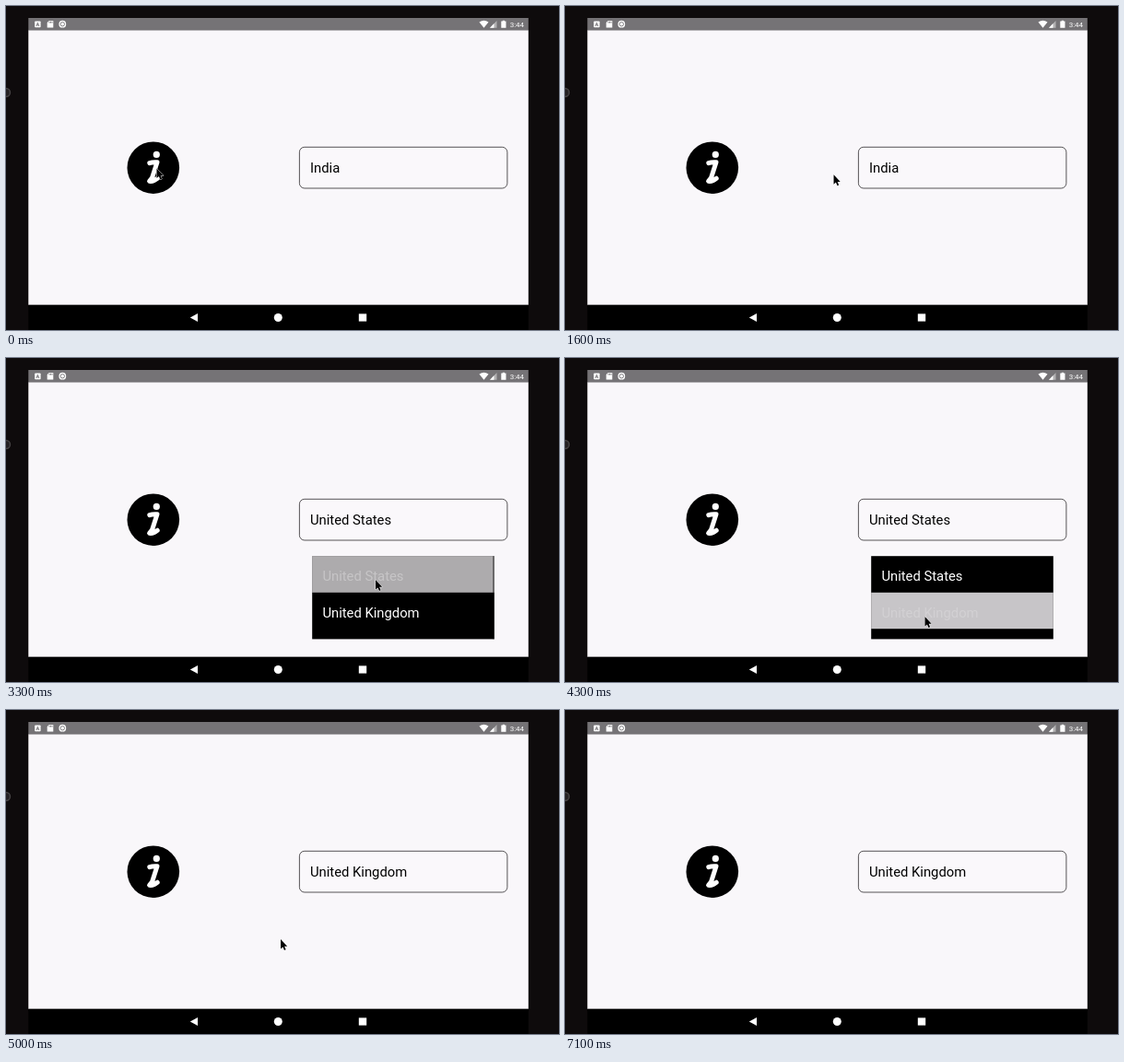
Write an HTML page that moves like this. It is 600 px wide and 352 px high and loops after 7800 ms.

```html
<!DOCTYPE html>
<html lang="en">
<head>
<meta charset="utf-8">
<title>Country picker</title>
<style>
html, body { margin: 0; width: 100%; height: 100%; overflow: hidden; background: #0e0b0c; }
svg { display: block; width: 600px; height: 352px; }
text { font: 14.8px Roboto, "Noto Sans", sans-serif; }
</style>
</head>
<body>
<svg viewBox="0 0 600 352">
  <rect width="600" height="352" fill="#0e0b0c"/>
  <circle cx="0" cy="94" r="4.5" fill="#242123" stroke="#454243" stroke-width="1.4"/>
  <rect x="24.3" y="13" width="542.5" height="14" fill="#757376"/>
  <rect x="24.3" y="26.5" width="542.5" height="298.3" fill="#f9f7fa"/>
  <rect x="24.3" y="324.8" width="542.5" height="27.2"/>

  <g fill="#fff">
    <rect x="31.2" y="16.4" width="6.4" height="6.8" rx=".8"/>
    <path d="M46.7 15.9H51.3V23.5H44.7V18Z"/>
    <circle cx="61.3" cy="19.7" r="3.9"/>
    <path d="M513.5 17.6Q518.5 13.8 523.5 17.6L518.5 23.8Z"/>
    <path d="M525 23.7L532.5 16V23.7Z" opacity=".45"/>
    <path d="M525 23.7L529.5 19.1V23.7Z"/>
    <path d="M537.3 16.6H538.8V15.8H541V16.6H542.5V23.7H537.3Z"/>
    <text x="546.7" y="22.8" style="font-size:8px">3:44</text>
    <path d="M199.8 338.5L208 334V343Z"/>
    <circle cx="295.3" cy="338.5" r="4.5"/>
    <rect x="382.8" y="334.4" width="8.4" height="8.2"/>
  </g>
  <g fill="none" stroke="#757376" stroke-width=".9">
    <path d="M33 22L34.4 18L35.8 22M33.6 20.6H35.2"/>
    <path d="M47 16.8V18.5M48.5 16.8V18.5M50 16.8V18.5"/>
    <circle cx="61.3" cy="19.7" r="2.2"/>
  </g>

  <circle cx="159.8" cy="175.7" r="28.3"/>
  <circle cx="163.3" cy="161.4" r="3.6" fill="#fff"/>
  <path d="M155.8 170.6Q159 169.4 164 169.8L158.6 186.5Q157 191.5 164.2 187.4M158.6 186.5L155.6 190.2Q159 191.6 164.2 187.4" fill="none" stroke="#fff" stroke-width="5" stroke-linecap="round" stroke-linejoin="round"/>

  <rect x="318.4" y="153.3" width="225.5" height="44.7" rx="5.5" fill="#faf8fb" stroke="#2c2a2c" stroke-width=".8"/>
  <text id="value" x="330" y="181.4"></text>

  <g id="menu">
    <rect x="332.2" y="215.2" width="197.6" height="90.2"/>
    <rect id="glow0" x="332.2" y="215.2" width="197.6" height="39.6" fill="#f9f7fa"/>
    <rect id="glow1" x="332.2" y="254.8" width="197.6" height="39.4" fill="#f9f7fa"/>
    <rect id="scrollbar" x="528" y="215.2" width="1.8" height="90.2" opacity=".4"/>
    <text id="item0" x="343.4" y="242.1" fill="#fff">United States</text>
    <text id="item1" x="343.4" y="281.6" fill="#fff">United Kingdom</text>
  </g>
  <path id="cursor" d="M0 0V10.6L2.4 8.4L4 12L5.6 11.3L4.1 7.8H7.2Z" stroke="#fff" stroke-width=".9" paint-order="stroke"/>
</svg>
<script>
const LOOP = 7800, STEP = 100;
const $ = id => document.getElementById(id);

const place = {
  icon: [163.5, 176.5], below: [272, 249], middle: [238, 187], field: [420, 174],
  row0: [401, 241], row1: [390.5, 281], aside: [298, 249], near: [340, 253],
  iconEdge: [189, 184], away: [390, 87]
};
// Pointer trips: destination, departure, arrival
const trips = [
  ["below", 100, 500], ["icon", 700, 1100], ["middle", 1100, 1300],
  ["field", 1500, 1840], ["row0", 2400, 2900], ["row1", 3500, 4100],
  ["aside", 4400, 4800], ["near", 5300, 5600], ["iconEdge", 5985, 6400],
  ["middle", 6400, 6600], ["away", 6700, 7000]
];

const clamp = v => Math.max(0, Math.min(1, v));
const progress = (t, from, to) => clamp((t - from) / (to - from));

function pointerAt(t) {
  return trips.reduce((pos, [name, leave, arrive]) => {
    const k = progress(t, leave, arrive);
    return pos.map((v, axis) => v + (place[name][axis] - v) * k);
  }, place.icon);
}

// Rises over the first span and falls over the second
const pulse = (t, on, rise, off, fall) =>
  progress(t, on, on + rise) * (1 - progress(t, off, off + fall));

// A held row dims to 0.2, letting the page show through
function setRow(n, t, down, up) {
  const dim = 0.8 * pulse(t, down, 200, up, 300);
  $("glow" + n).setAttribute("opacity", dim);
  $("item" + n).setAttribute("opacity", 1 - dim);
}

function render(time) {
  const t = Math.floor((time % LOOP) / STEP) * STEP;
  const label = t < 3300 ? "India" : t < 4500 ? "United States" : "United Kingdom";
  if ($("value").textContent !== label) $("value").textContent = label;

  $("menu").setAttribute("opacity", pulse(t, 2100, 200, 4800, 200));
  setRow(0, t, 2900, 3260);
  setRow(1, t, 4100, 4350);
  $("scrollbar").style.display = t < 3700 ? "" : "none";

  $("cursor").setAttribute("transform", `translate(${pointerAt(t)})`);
  $("cursor").style.display = t < 7100 ? "" : "none";
}

const start = performance.now();
function tick() {
  render(performance.now() - start);
  requestAnimationFrame(tick);
}
tick();
</script>
</body>
</html>
```
